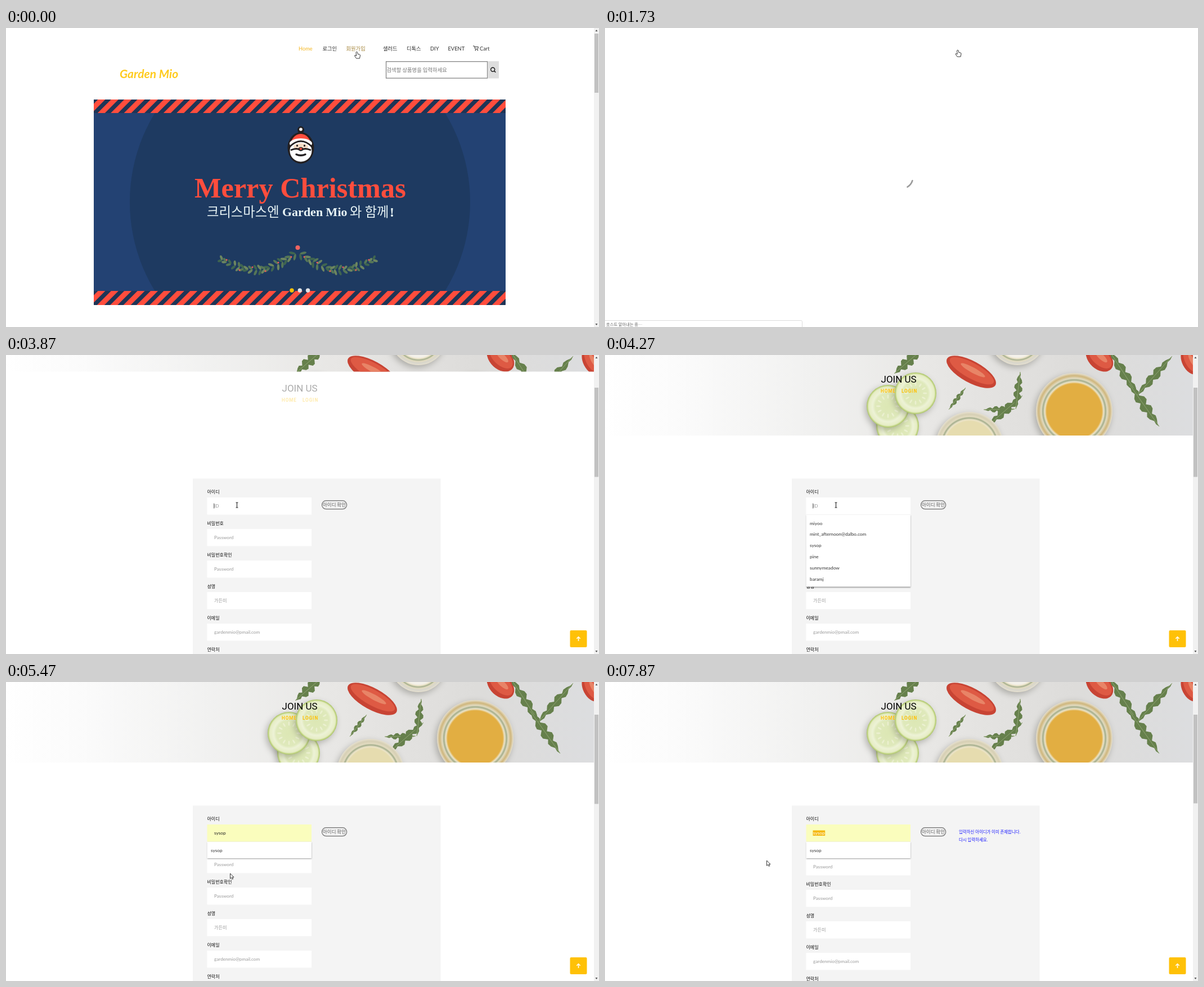
An HTML page with a canvas that plays this animation: 1054 by 531 pixels, repeating every 8 s.

```html
<!DOCTYPE html>
<html lang="ko">
<head>
<meta charset="utf-8">
<title>Shop sign-up</title>
<style>
html, body { margin: 0; width: 100%; height: 100%; overflow: hidden; background: #fff; }
canvas { display: block; }
</style>
</head>
<body>
<canvas id="stage" width="1054" height="531"></canvas>
<script>
const ctx = document.getElementById('stage').getContext('2d');
const W = 1054, H = 531, LOOP = 8000, SCROLL = 161;
const LATIN = 'Lato, "Noto Sans CJK KR", sans-serif';
const HANGUL = '"Noto Sans CJK KR", "Noto Sans CJK", sans-serif';
const GOLD = '#ffc107', RED = '#ff4d3d', NAVY = '#1e3a61';
const SHOP = 'Garden Mio', USER = 'sysop';
const USERS = ['miyoo', 'mint_afternoon@dalbo.com', USER, 'pine', 'sunnymeadow', 'baramj'];

const TICKS = [0, 270, 670, 1070, 1730, 2000, 2170, 2330, 2670, 2900, 3130, 3400, 3600,
  3870, 4130, 4270, 4400, 4530, 4800, 5070, 5200, 5470, 5600, 5730, 5870, 6000, 6130,
  6270, 6470, 6600, 6730, 6870, 7000, 7130, 7330, 7600, 7730, 7870];

// time, shape, hotspot
const POINTER = [
  [0, 'hand', 623.5, 42], [1070, 'hand', 627, 39], [3130, 'arrow', 596, 120],
  [3400, 'arrow', 500, 205], [3600, 'beam', 430, 256], [3870, 'beam', 410.5, 266.5],
  [4400, 'arrow', 405, 289], [4530, 'arrow', 400, 300], [4800, 'arrow', 399.5, 302.5],
  [5070, 'arrow', 399.5, 318], [5200, 'arrow', 398.5, 340], [5600, 'arrow', 410, 334],
  [5730, 'arrow', 440, 318], [5870, 'arrow', 478, 300], [6000, 'beam', 515, 279],
  [6130, 'arrow', 549, 272], [6270, 'hand', 568, 265], [6470, 'hand', 574.5, 263],
  [7000, 'arrow', 552, 266], [7130, 'beam', 490, 269], [7330, 'beam', 425, 269],
  [7600, 'beam', 395, 268], [7730, 'arrow', 271, 316], [7870, 'arrow', 287.5, 317]
];

const lastAt = (list, t) => list.filter(e => e[0] <= t).pop();

function rect(x, y, w, h, fill) {
  ctx.fillStyle = fill;
  ctx.fillRect(x, y, w, h);
}

function round(x, y, w, h, r) {
  ctx.beginPath();
  ctx.roundRect(x, y, w, h, r);
}

function oval(x, y, rx, ry, fill, turn = 0) {
  ctx.beginPath();
  ctx.ellipse(x, y, rx, ry, turn, 0, 7);
  ctx.fillStyle = fill;
  ctx.fill();
}

function stroke(color, width) {
  ctx.strokeStyle = color;
  ctx.lineWidth = width;
  ctx.stroke();
}

function line(points, color, width) {
  ctx.beginPath();
  points.forEach(p => ctx.lineTo(...p));
  stroke(color, width);
}

function clipTo(x, y, w, h, draw) {
  ctx.save();
  ctx.beginPath();
  ctx.rect(x, y, w, h);
  ctx.clip();
  draw();
  ctx.restore();
}

// y is the vertical middle of the glyphs
function text(s, x, y, size, color, style = '', family) {
  family = family || (/[가-힣]/.test(s) ? HANGUL : LATIN);
  ctx.font = `${style} ${size}px ${family}`;
  ctx.fillStyle = color;
  ctx.fillText(s, x, y + size * 0.36);
}

function scrollbar(top, height) {
  rect(1045, 0, 9, H, '#f1f1f1');
  rect(1046, top, 7, height, '#c1c1c1');
  ctx.fillStyle = '#505050';
  for (const [y, d] of [[4, 1], [527, -1]]) {
    ctx.beginPath();
    ctx.moveTo(1047.5, y + 2 * d);
    ctx.lineTo(1049.5, y - d);
    ctx.lineTo(1051.5, y + 2 * d);
    ctx.fill();
  }
}

function header(active, joinColor) {
  const dark = '#333';
  const links = [['Home', 520, active ? '#f4b722' : dark], ['로그인', 562.5, dark],
    ['회원가입', 604.5, joinColor], ['샐러드', 670, dark], ['디톡스', 712, dark],
    ['DIY', 754, dark], ['EVENT', 785.5, dark], ['Cart', 842, dark]];
  links.forEach(([s, x, c]) => text(s, x, 36.5, 9.3, c));
  line([[830, 32], [832.5, 32], [834, 37.5], [838.5, 37.5], [839.5, 33.5], [833, 33.5]], '#333', 1);
  oval(834.5, 39.5, 0.9, 0.9, '#333');
  oval(838.3, 39.5, 0.9, 0.9, '#333');
  text(SHOP, 202, 81, 21, '#ffcb1f', 'italic bold');
  ctx.strokeStyle = '#858585';
  ctx.lineWidth = 1.3;
  ctx.strokeRect(675.6, 59.6, 180, 29.5);
  text('검색할 상품명을 입력하세요', 676.5, 74.5, 9.35, '#777');
  rect(856, 59, 20, 30.5, '#dedede');
  ctx.beginPath();
  ctx.arc(865.2, 73.8, 3.5, 0, 7);
  stroke('#111', 1.4);
  line([[867.8, 76.3], [870.3, 78.8]], '#111', 1.5);
}

function stripes(y, h) {
  const period = 23.4;
  clipTo(156, y, 732, h, () => {
    rect(156, y, 732, h, '#1e3556');
    ctx.fillStyle = RED;
    for (let x = 140; x < 920; x += period) {
      ctx.beginPath();
      ctx.moveTo(x, y);
      ctx.lineTo(x + 13, y);
      ctx.lineTo(x + 13 - h, y + h);
      ctx.lineTo(x - h, y + h);
      ctx.fill();
    }
  });
}

function santa() {
  const ink = '#231f20';
  oval(524, 181, 6, 6.5, ink);
  oval(524, 180, 2.8, 2.8, '#fff');
  oval(524, 213, 23.5, 28, ink);
  clipTo(500, 185, 48, 16, () => oval(524, 212, 19, 24, RED));
  oval(524, 218, 19.5, 19.5, '#fff');
  oval(524, 205, 20, 9, '#fff');
  ctx.beginPath();
  ctx.moveTo(504, 211);
  ctx.quadraticCurveTo(524, 191, 544, 211);
  stroke(ink, 3);
  oval(524, 211, 13, 6.5, '#f4ddc8');
  oval(517.5, 209, 1.7, 1.7, ink);
  oval(530.5, 209, 1.7, 1.7, ink);
  ctx.beginPath();
  ctx.moveTo(506, 217);
  ctx.quadraticCurveTo(517, 212, 524, 217);
  ctx.quadraticCurveTo(531, 212, 542, 217);
  stroke(ink, 3);
  oval(524, 215, 4.6, 3.6, ink);
  oval(524, 214.6, 2.4, 1.8, RED);
  ctx.lineCap = 'round';
  ctx.beginPath();
  ctx.moveTo(516, 224.5);
  ctx.quadraticCurveTo(524, 228, 532, 224.5);
  stroke(ink, 3.4);
  ctx.lineCap = 'butt';
}

function garland() {
  const greens = ['#6c8560', '#3f6550', '#557657'];
  for (const side of [-1, 1]) {
    for (let i = 0; i < 18; i++) {
      const t = i / 17;
      const x = 518.5 + side * (4 + 130 * t);
      const y = 401 + 11 * t + 23 * Math.sin(Math.PI * t);
      const slope = Math.atan2(11 + 72 * Math.cos(Math.PI * t), 130 * side);
      const size = 6 - 1.6 * t;
      for (const d of [-1, 1]) {
        const a = slope + d * (0.8 + 0.35 * Math.sin(i * 5));
        oval(x + Math.cos(a) * size, y + Math.sin(a) * size, size, 2.2, greens[(i + d + 3) % 3], a);
      }
      if (i % 3 === 1) oval(x, y + 5 * Math.sin(i * 3), 1.5, 1.5, '#ef5b5b');
    }
  }
  oval(518.5, 390, 4, 4, '#ef6461');
}

function home(joinColor) {
  header(true, joinColor);
  rect(156, 127, 732, 365, '#234273');
  clipTo(156, 127, 732, 365, () => oval(522.5, 309, 302.5, 302.5, NAVY));
  stripes(127, 24);
  stripes(467, 25);
  santa();
  ctx.font = 'bold 50.3px "Liberation Serif", serif';
  ctx.fillStyle = RED;
  ctx.fillText('Merry Christmas', 335, 301);
  text('크리스마스엔', 357, 326.5, 23.3, '#e8f4f6', '300');
  text(SHOP, 491, 326.5, 22, '#e8f4f6', 'bold', '"Liberation Serif", serif');
  text('와 함께', 611, 326.5, 23.3, '#e8f4f6', '300');
  text('!', 682, 326, 24, '#e8f4f6', 'bold', '"Liberation Serif", serif');
  garland();
  [508, 522.3, 536.6].forEach((x, i) => oval(x, 466, 3.7, 3.7, i ? '#dfe1e6' : GOLD));
  scrollbar(10, 105);
}

// stops: [offset, colour, ...]
function shade(gradient, ...stops) {
  for (let i = 0; i < stops.length; i += 2) gradient.addColorStop(stops[i], stops[i + 1]);
  return gradient;
}

function disc(x, y, r, ...stops) {
  ctx.save();
  ctx.shadowColor = 'rgba(70,70,60,.35)';
  ctx.shadowBlur = 12;
  ctx.shadowOffsetX = -3;
  ctx.shadowOffsetY = 4;
  oval(x, y, r, r, shade(ctx.createRadialGradient(x, y, 0, x, y, r), ...stops));
  ctx.restore();
}

// a tapered leaf with a toothed edge
function leaf(x1, y1, x2, y2, width) {
  const dx = x2 - x1, dy = y2 - y1, len = Math.hypot(dx, dy), n = 14;
  ctx.beginPath();
  for (let i = 0; i <= 2 * n; i++) {
    const t = i <= n ? i / n : 2 - i / n;
    const w = (i <= n ? 1 : -1) * width / 2 * Math.sin(Math.PI * t) * (i % 3 ? 1 : 0.35);
    ctx.lineTo(x1 + dx * t - dy / len * w, y1 + dy * t + dx / len * w);
  }
  ctx.fillStyle = '#66804c';
  ctx.fill();
  line([[x1, y1], [x2, y2]], '#8fa472', 1);
}

function cucumber(x, y, r) {
  disc(x, y, r, 0, '#dce7b4', 0.6, '#dfe9bb', 0.72, '#edf2d6', 0.9, '#e6edc4', 0.96, '#c0d483', 1, '#a9c264');
  for (let i = 0; i < 12; i++) {
    const a = i * Math.PI / 6;
    oval(x + Math.cos(a) * r * 0.45, y + Math.sin(a) * r * 0.45, r * 0.1, 1.4, '#ebf0d0', a);
  }
}

function tomato(x, y, rx, ry, turn) {
  oval(x, y, rx, ry, '#c84434', turn);
  oval(x + 1, y - 2, rx * 0.9, ry * 0.72, '#de5a44', turn);
  oval(x + 3, y - 3, rx * 0.5, ry * 0.25, '#e88467', turn);
}

function jar(x, y, r, glass, fill) {
  disc(x, y, r, 0, fill, 0.72, fill, 0.77, '#ece4c9', 0.82, '#a3ad8c', 0.86, '#e2dbc0', 0.93, glass, 1, '#e6e0cf');
}

function photo() {
  rect(0, -59, 1045, 202, shade(ctx.createLinearGradient(0, 0, 1045, 0),
    0, '#fff', 0.15, '#fafafa', 0.35, '#f1f1f0', 0.55, '#e8e7e5', 0.8, '#dddcda', 1, '#dcdddf'));
  leaf(514, 33, 564, -10, 20);
  cucumber(520, 126, 38);
  cucumber(503, 91, 38);
  cucumber(552, 68, 37);
  tomato(651, 30, 49, 19, 0.5);
  jar(733, -32, 50, '#d8d6cd', '#f4f1ea');
  tomato(879, 6, 28, 19, 0.75);
  tomato(1040, 12, 24, 14, 1.1);
  leaf(611, 97, 641, 58, 9);
  leaf(673, 97, 728, 96, 12);
  leaf(682, 124, 742, 72, 17);
  leaf(730, 96, 738, 30, 15);
  leaf(896, -8, 948, 72, 18);
  leaf(932, 52, 985, 127, 20);
  leaf(945, 72, 1008, 2, 17);
  jar(648, 161, 60, '#d6cfb4', '#e6dcaf');
  jar(834, 100, 68, '#cfb67c', '#e2ae42');
}

function hero(t) {
  if (t >= 2900) clipTo(0, -59, 1045, t >= 4130 ? 202 : 88.5, photo);
  if (t < 3870) return;
  const [, alpha, shift] = lastAt([[3870, 0.33, 16], [4130, 0.85, 3], [4270, 1, 0]], t);
  ctx.save();
  ctx.globalAlpha = alpha;
  text('JOIN US', 490.5, 42.5 + shift, 17, '#000', '', 'Roboto, sans-serif');
  ctx.letterSpacing = '0.9px';
  text('HOME', 490, 64.5 + shift, 8.2, GOLD, 'bold', 'Roboto, sans-serif');
  text('LOGIN', 527, 64.5 + shift, 8.2, GOLD, 'bold', 'Roboto, sans-serif');
  ctx.restore();
}

function popup(items, height, hover) {
  ctx.save();
  ctx.shadowColor = 'rgba(0,0,0,.4)';
  ctx.shadowBlur = 2;
  ctx.shadowOffsetY = 1;
  rect(357.5, 284, 185.5, height, '#fff');
  ctx.restore();
  if (hover >= 0) rect(358, 288.7 + hover * 19.8, 185, 19.6, '#e8ebec');
  items.forEach((s, i) => text(s, 364, 298.7 + i * 19.8, 8.3, '#333'));
}

function idField(t) {
  const hover = lastAt([[0, -1], [4530, 0], [5070, 1], [5200, 2]], t)[1];
  const selected = t >= 7730;
  rect(357.5, 253, 185.5, 30.5, hover < 0 ? '#fff' : '#fafdbd');
  const value = hover < 0 ? 'ID' : USERS[hover];
  if (selected) {
    ctx.font = `8.3px ${LATIN}`;
    rect(369.5, 263.5, ctx.measureText(value).width + 1, 9.5, '#f5b912');
  }
  text(value, 370, 268.5, 8.3, selected ? '#fff' : hover < 0 ? '#999' : '#222');
  if (t >= 3870 && t < 5470 || t >= 7330 && t < 7730) rect(369.4, 263.5, 0.8, 9, '#222');
  if (t >= 4270 && t < 5470) popup(USERS, 127.5, hover);
  else if (t >= 5470 && t < 6600 || selected) popup([USER], 29, -1);
}

function form(t) {
  const warned = t >= 6730, drop = warned ? 4 : 0;
  rect(332, 219.5, 440.5, 500, '#f4f4f4');
  text('아이디', 357.5, 243.5, 8, '#111');
  const rows = [['비밀번호', 'Password'], ['비밀번호확인', 'Password'], ['성명', '가든미'],
    ['이메일', 'gardenmio@pmail.com'], ['연락처', '']];
  rows.forEach(([label, hint], i) => {
    const y = 299.5 + i * 56 + drop;
    text(label, 357.5, y, 8, '#111');
    rect(357.5, y + 9.5, 185.5, 30.3, '#fff');
    text(hint, 370, y + 25, 8.2, '#999');
  });
  round(561.5, 258.7, 44.2, 15, 7.5);
  ctx.fillStyle = '#f0f0f0';
  ctx.fill();
  stroke('#707070', 1.2);
  text('아이디 확인', 563, 266.3, 8.5, '#666');
  if (warned) {
    text('입력하신 아이디가 이미 존재합니다.', 629, 266, 7.45, '#1a1aff');
    text('다시 입력하세요.', 629, 280.5, 7.45, '#1a1aff');
  }
  idField(t);
}

function join(t) {
  const scroll = lastAt([[0, 0], [3400, 80], [3600, SCROLL]], t)[1];
  ctx.save();
  if (t < 2670) ctx.globalAlpha = 0.3;
  ctx.save();
  ctx.translate(0, -scroll);
  header(false, t < 3130 ? '#f4b722' : '#333');
  ctx.restore();
  ctx.translate(0, SCROLL - scroll);
  hero(t);
  form(t);
  ctx.restore();
  scrollbar(10 + 48 * scroll / SCROLL, t >= 6730 ? 157.5 : 158.5);
  if (t >= 3870) {
    round(1002.5, 489, 30, 30, 2);
    ctx.fillStyle = GOLD;
    ctx.fill();
    line([[1017.5, 508], [1017.5, 501]], '#fff', 1.5);
    line([[1014.3, 503.8], [1017.5, 500.6], [1020.7, 503.8]], '#fff', 1.5);
  }
}

function spinner(t) {
  const start = 0.3 + (t - 1730) / 1000 * Math.PI;
  ctx.lineCap = 'round';
  ctx.beginPath();
  ctx.arc(527, 265, 20.3, start, start + 0.73 + (t - 1730) / 900);
  stroke('#9b9b9b', 2.6);
  ctx.lineCap = 'butt';
}

function status(t) {
  if (t < 270 || t >= 2900) return;
  const label = t < 1070 ? 'localhost:8080/join' : t < 2170 ? '호스트 알아내는 중…' : 'localhost 응답 대기 중…';
  ctx.save();
  if (t < 670) ctx.globalAlpha = 0.5;
  round(-2, 519.5, 352.5, 14, 2);
  ctx.fillStyle = '#fff';
  ctx.fill();
  stroke('#dcdcdc', 1);
  text(label, 2, 526, 7.3, '#666');
  ctx.restore();
}

const SHAPES = {
  arrow: 'M0 0V9.2L2.2 7.3L3.7 10.3L5.2 9.6L3.8 6.7H6.5Z',
  hand: 'M-1.4 1Q0 -1 1.2 1L1.8 4.4L5 5Q6.2 5.4 6 7L5 12H-.8L-3.6 8Q-4.4 6.3 -2.6 6.4L-.8 7.6Z'
};

function pointer(t) {
  const [, shape, x, y] = lastAt(POINTER, t);
  ctx.save();
  ctx.translate(x, y);
  if (shape === 'beam') {
    line([[0, -4.5], [0, 4.5]], '#222', 1.1);
    line([[-2, -4.5], [2, -4.5]], '#222', 1);
    line([[-2, 4.5], [2, 4.5]], '#222', 1);
  } else {
    const path = new Path2D(SHAPES[shape]);
    ctx.fillStyle = '#fff';
    ctx.fill(path);
    ctx.strokeStyle = '#222';
    ctx.lineWidth = 0.9;
    ctx.stroke(path);
  }
  ctx.restore();
}

function draw(now) {
  const time = now % LOOP;
  const t = TICKS.filter(k => k <= time).pop();
  rect(0, 0, W, H, '#fff');
  if (t < 1730) home(t < 270 ? '#a5863c' : '#f4b722');
  else if (t >= 2330) join(t);
  if (t >= 1730 && t < 2670) spinner(t);
  status(t);
  pointer(t);
}

const began = performance.now();
function loop() {
  draw(Math.max(0, performance.now() - began));
  requestAnimationFrame(loop);
}
loop();
</script>
</body>
</html>
```
